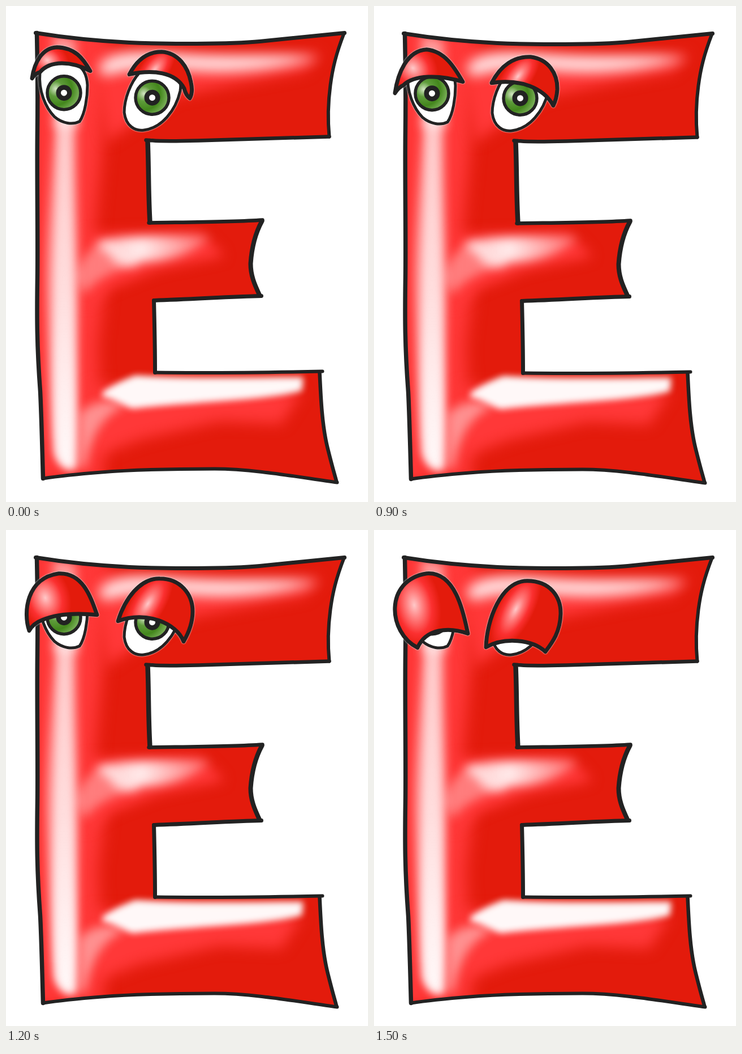
Recreate the animation shown at these times as an HTML page. Size 640x875 px, loop 1.8 s.

```html
<!DOCTYPE html>
<html lang="en">
<head>
<meta charset="utf-8">
<title>Sleepy letter E</title>
<style>
  html, body { margin: 0; width: 100%; height: 100%; overflow: hidden; background: #fff; }
  svg { display: block; width: 640px; height: 875px; }
  .ink { fill: none; stroke: #222; stroke-linecap: round; stroke-linejoin: round; }
  .eyes { filter: drop-shadow(0 0 .8px #fff); stroke: #222; stroke-linejoin: round; }
</style>
</head>
<body>
<svg viewBox="0 0 640 875">
  <defs>
    <clipPath id="body"><path d="M56 48C110 57 160 62 220 65S400 68 450 63S550 53 599 48C585 85 579 110 575 140S570 200 573 231C500 233 420 236 340 238S270 238 250 237C254 290 253 330 256 383C300 382 400 382 455 378C443 400 436 425 434 455C434 475 440 490 451 512C400 513 330 518 263 520C264 560 265 610 265 647C350 648 460 647 556 645C558 690 560 740 570 780S582 825 587 841C520 832 440 817 370 817C300 817 220 819 170 823S100 829 67 834C65 760 64 720 62 680C56 600 56 550 57 480S56 300 57 220S57 100 56 48Z"/></clipPath>
    <linearGradient id="stem" x1="0" y1="0" x2="0" y2="1">
      <stop stop-color="#fff" stop-opacity=".6"/>
      <stop offset=".5" stop-color="#fff" stop-opacity=".75"/>
      <stop offset="1" stop-color="#fff"/>
    </linearGradient>
    <linearGradient id="fade">
      <stop stop-color="#fff" stop-opacity=".7"/>
      <stop offset=".4" stop-color="#fff" stop-opacity=".9"/>
      <stop offset="1" stop-color="#fff" stop-opacity=".2"/>
    </linearGradient>
    <radialGradient id="iris" cx=".25" cy=".38" r=".75">
      <stop stop-color="#d3e6c4"/>
      <stop offset=".3" stop-color="#5f9c3b"/>
      <stop offset=".65" stop-color="#43861c"/>
      <stop offset="1" stop-color="#7fb35e"/>
    </radialGradient>
    <radialGradient id="lid0" cx=".27" cy=".42" r=".6" gradientTransform="rotate(-10 .3 .4) translate(.1) scale(.6 1)">
      <stop stop-color="#ffc8c8"/><stop offset=".3" stop-color="#ff8080"/>
      <stop offset=".65" stop-color="#fb3030"/><stop offset="1" stop-color="#e31b0c"/>
    </radialGradient>
    <radialGradient id="lid1" cx=".4" cy=".4" r=".6" gradientTransform="rotate(26 .4 .4) translate(.24) scale(.4 1)">
      <stop stop-color="#ffc8c8"/><stop offset=".3" stop-color="#ff7878"/>
      <stop offset=".65" stop-color="#fb3030"/><stop offset="1" stop-color="#e31b0c"/>
    </radialGradient>
  </defs>
  <g id="letter">
    <g transform="translate(-1.5 .5)">
      <g clip-path="url(#body)">
        <path fill="#e31b0c" d="M40 30H620V860H40Z"/>
        <g id="shading"></g>
      </g>
      <g id="outline" class="ink"></g>
    </g>
    <g class="eyes" transform="translate(0 .7)">
      <g fill="#fff" stroke-width="5">
        <path d="M60 118C57 150 70 180 86 196C100 208 118 210 130 204C140 190 144 160 144 140C143 122 136 108 122 102C100 96 75 102 60 118Z"/>
        <path d="M236 118C220 135 209 165 209 188C212 212 228 222 245 219C275 215 300 185 308 150C310 138 308 130 303 124C285 115 260 113 236 118Z"/>
      </g>
      <g id="irises"></g>
      <path id="leftLid" fill="url(#lid0)" stroke-width="7"/>
      <path id="rightLid" fill="url(#lid1)" stroke-width="7"/>
    </g>
  </g>
</svg>
<script>
const $ = id => document.getElementById(id);
const BRIGHT = '#ff3838', WHITE = '#fff';

// fill, blur, opacity, path
const shades = [
  [BRIGHT, 14, 1, 'M40 30H185L172 250L158 400L176 500L164 600L175 840H40Z'],
  [BRIGHT, 12, 1, 'M150 72L400 84L560 84L530 116L410 138L300 160L180 240Z'],
  [BRIGHT, 11, 1, 'M140 402L345 398L388 442L270 466L185 500L140 530Z'],
  [BRIGHT, 12, 1, 'M150 670L525 680L488 738L380 733L240 765L150 800Z'],
  [WHITE, 9, .5, 'M85 50L125 60L130 215H85Z'],
  ['url(#stem)', 8, .65, 'M86 195C80 320 70 420 73 520S80 740 86 790Q98 824 125 818C130 740 128 640 130 540S126 330 128 195Z'],
  ['url(#stem)', 7, .9, 'M94 195C92 320 86 420 86 520S86 740 90 790Q100 820 122 815C126 740 122 640 122 540S116 330 118 195Z'],
  [WHITE, 11, .85, 'M165 112C170 88 210 76 300 84S480 84 555 92C480 112 400 122 320 114S210 116 175 124Z'],
  ['url(#fade)', 9, 1, 'M160 420C190 405 260 406 365 406C335 434 300 450 240 452C225 468 200 462 185 440Z'],
  [WHITE, 9, .35, 'M126 480C130 450 150 424 180 414L205 440C235 475 180 455 140 510Z'],
  [WHITE, 6, .97, 'M172 682C190 668 215 658 230 652C330 658 430 655 527 655L525 679C470 696 340 698 225 711C205 704 190 692 172 690Z'],
  [WHITE, 9, .45, 'M132 720C150 698 180 692 215 705C172 720 152 760 142 815H130Z']
];
$('shading').innerHTML = shades.map(([fill, blur, opacity, d]) =>
  `<path fill="${fill}" opacity="${opacity}" style="filter:blur(${blur}px)" d="${d}"/>`).join('');

// width, path
const strokes = [
  [7, 'M54 48C110 57 160 62 220 65S400 68 450 63S550 53 600 48'],
  [6, 'M599 49C585 85 579 110 575 140S570 200 573 231'],
  [6.5, 'M573 231C500 233 420 236 340 238S270 238 249 237'],
  [8.5, 'M252 239C254 290 253 330 256 382'],
  [6.5, 'M254 383C300 382 400 382 455 378'],
  [8, 'M454 380C443 400 436 425 434 455C434 475 440 490 450 511'],
  [7, 'M453 512C400 513 330 518 263 520'],
  [7, 'M263 520C264 560 265 610 265 647'],
  [6, 'M265 647C350 648 460 647 561 645'],
  [6.5, 'M556 646C558 690 560 740 570 780S582 825 586 840'],
  [6, 'M587 841C520 832 440 817 370 817C300 817 220 819 170 823S100 829 67 834'],
  [7.5, 'M67 834C65 760 64 720 62 680C56 600 56 550 57 480S56 300 57 220S57 100 56 48']
];
$('outline').innerHTML = strokes.map(([w, d]) => `<path stroke-width="${w}" d="${d}"/>`).join('');

$('irises').innerHTML = [[102.5, 153.5], [258.5, 162]].map(([x, y]) => `
  <circle cx="${x}" cy="${y}" r="29.5" fill="url(#iris)" stroke-width="5.5"/>
  <circle cx="${x}" cy="${y}" r="14" fill="#222" stroke="none"/>
  <circle cx="${x}" cy="${y}" r="5.5" fill="#fff" stroke="none"/>`).join('');

// Lid shapes from open to closed: left, right
const lids = [
  ['M46 128C50 100 64 74 90 73C122 74 136 92 149 115C115 97 78 96 60 117Q52 119 46 128Z',
   'M218 121C232 94 252 81 275 81C305 83 322 108 327 135Q331 153 325 163Q318 158 315 146C300 117 260 112 218 121Z'],
  ['M37 153C42 118 58 78 93 76C125 79 142 107 157 133C115 120 70 121 52 139Q43 143 37 153Z',
   'M208 135C224 104 248 88 277 89C308 93 325 118 324 147Q323 163 317 175C300 144 258 127 208 135Z'],
  ['M41 177C30 145 36 84 93 76C136 74 150 118 161 149C122 145 88 148 64 158Q48 164 41 177Z',
   'M198 160C210 121 237 84 272 85C308 85 330 112 330 143C330 165 321 184 314 196C302 164 248 141 198 160Z'],
  ['M77 207C24 180 18 88 93 76C145 72 159 149 166 182C132 170 92 173 77 207Z',
   'M198 206C199 160 224 89 271 89C312 89 331 118 330 148C329 180 315 198 303 214C280 192 230 188 198 206Z']
];

// The lids snap from pose to pose: open for 900 ms, then 300 ms each
function draw(now) {
  const t = now % 1800;
  const pose = t < 900 ? 0 : Math.floor((t - 600) / 300);
  $('leftLid').setAttribute('d', lids[pose][0]);
  $('rightLid').setAttribute('d', lids[pose][1]);
  $('letter').setAttribute('transform', `translate(0 ${pose ? 0 : -1})`);
}

function tick() {
  draw(performance.now());
  requestAnimationFrame(tick);
}
tick();
</script>
</body>
</html>
```
